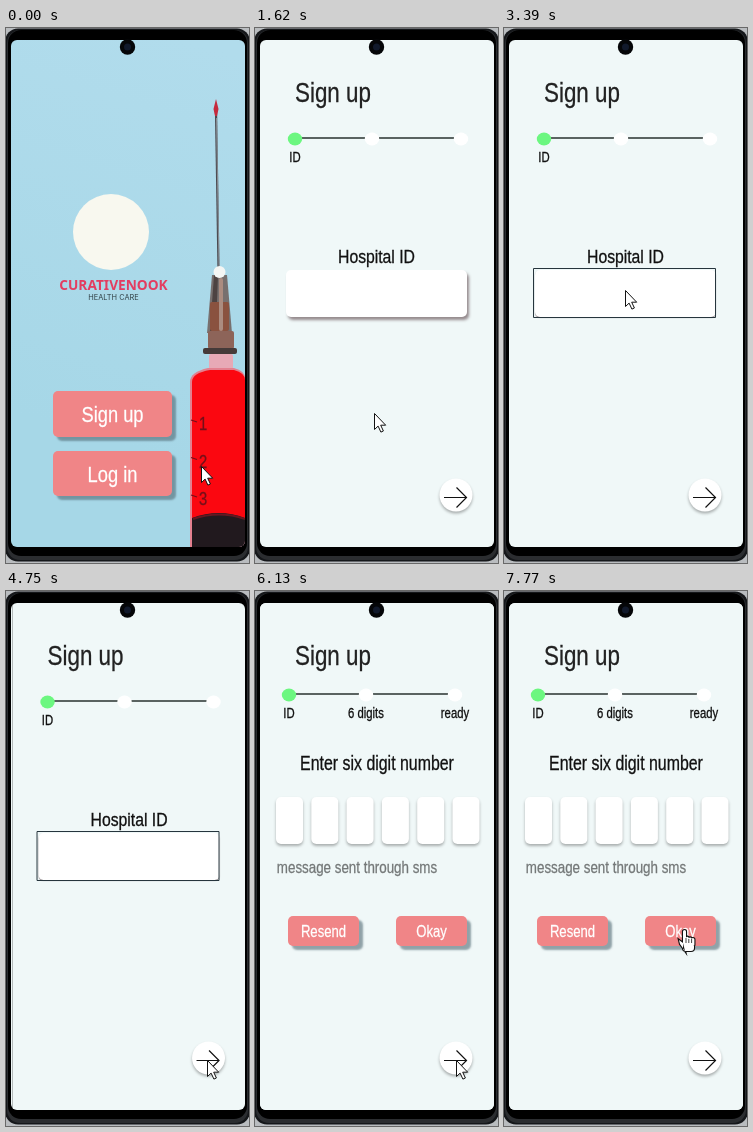
Write an HTML page with a canvas that moves like this. It is 243 px wide and 535 px high and loops after 8000 ms.

```html
<!DOCTYPE html>
<html lang="en">
<head>
<meta charset="utf-8">
<title>Health app sign-up</title>
<style>
html, body { margin: 0; width: 100%; height: 100%; overflow: hidden; background: #b9bcbf; }
canvas { display: block; width: 243px; height: 535px; }
</style>
</head>
<body>
<canvas id="stage" width="243" height="535"></canvas>
<script>
const ctx = document.getElementById('stage').getContext('2d');
const LOOP = 8000, TICK = 125;
const LEFT = 5, TOP = 12, WIDTH = 234, HEIGHT = 507;
const NARROW = 0.82; // one condensed face for all interface text
const CORAL = '#f08587', INK = '#111';

const FORM_AT = 1620, HOVER_AT = 2670, FOCUS_AT = 3390, PUSH_AT = 4700, FADE_AT = 5850, CODE_AT = 6120;

// Pointer moves: start, end, destination
const START = { x: 195, y: 438 };
const MOVES = [
  { from: 0, to: 600, x: 119, y: 385 },
  { from: 2400, to: 2750, x: 121, y: 262 },
  { from: 3560, to: 4125, x: 201, y: 469 },
  { from: 6450, to: 7125, x: 104, y: 343 },
  { from: 7250, to: 7750, x: 180, y: 338 }
];

const progress = (t, from, to) => Math.min(1, Math.max(0, (t - from) / (to - from)));
const smooth = p => p * p * (3 - 2 * p);
const cubic = p => p < 0.5 ? 4 * p ** 3 : 1 - 4 * (1 - p) ** 3;
const mix = (a, b, p) => a + (b - a) * p;

function rect(x, y, w, h, r, fill) {
  ctx.fillStyle = fill;
  ctx.beginPath();
  ctx.roundRect(x, y, w, h, r);
  ctx.fill();
}

function oval(x, y, rx, ry, fill) {
  ctx.fillStyle = fill;
  ctx.beginPath();
  ctx.ellipse(x, y, rx, ry, 0, 0, Math.PI * 2);
  ctx.fill();
}

function line(d, color, width) {
  ctx.strokeStyle = color;
  ctx.lineWidth = width;
  ctx.stroke(new Path2D(d));
}

function shape(d, fill) {
  ctx.fillStyle = fill;
  ctx.fill(new Path2D(d));
}

function withShadow(color, dx, dy, blur, draw) {
  ctx.save();
  ctx.shadowColor = color;
  ctx.shadowOffsetX = dx;
  ctx.shadowOffsetY = dy;
  ctx.shadowBlur = blur;
  draw();
  ctx.restore();
}

function label(text, x, y, size, color = INK, align = 'center') {
  ctx.save();
  ctx.translate(x, y);
  ctx.scale(NARROW, 1);
  ctx.font = `${size}px "Liberation Sans", Arial, sans-serif`;
  ctx.textAlign = align;
  ctx.fillStyle = ctx.strokeStyle = color;
  ctx.lineWidth = 0.3;
  ctx.fillText(text, 0, 0);
  ctx.strokeText(text, 0, 0);
  ctx.restore();
}

function caption(text, y, font, color) {
  ctx.font = font;
  ctx.textAlign = 'center';
  ctx.fillStyle = color;
  ctx.fillText(text, 107.5, y);
}

function button(text, x, y, w, h, size) {
  withShadow('rgba(80,105,115,.6)', 4, 4, 2, () => rect(x, y, w, h, 5, CORAL));
  label(text, x + w / 2, y + h / 2 + size * 0.36, size, '#fff');
}

function syringe() {
  line('M210 82L212.5 240', '#4b4a50', 2.2);
  line('M210.5 90L213 238', '#a3adb4', 0.7);
  shape('M210 71l2.5 10-1.5 7h-2l-1.5-7z', '#c52a3d');

  shape('M206 247h15l5 58h-25z', '#77706f');
  shape('M208 247h4l-2 56h-6z', '#4d4342');
  rect(204, 274, 19, 29, 2, '#8a523f');
  rect(213, 250, 4, 53, 2, '#ab8c80');
  oval(213.5, 244, 6, 6, '#f4f6f4');
  rect(202, 303, 26, 18, 2, '#8d6459');
  rect(197, 320, 34, 6, 2, '#453a39');

  rect(203, 326, 24, 16, 2, '#e7a9b6');
  shape('M184 519V354q0-10 18-14h26q11 3 11 10v169z', '#e3808f');
  shape('M186 490V354q0-9 18-12h24q11 3 11 10v138z', '#fb0710');
  shape('M186 519V490q27-10 53 0v29z', '#21191e');
  line('M187 491q26-9 52 0', '#661821', 2);
  for (let i = 0; i < 3; i++) {
    const y = 396 + i * 37.5;
    line(`M185 ${y - 4}l6 2`, '#74101a', 1.2);
    label(i + 1, 197, y + 6, 18, '#74101a');
  }
}

function welcome() {
  const sky = ctx.createLinearGradient(180, TOP, 60, 400);
  sky.addColorStop(0, '#b1dcec');
  sky.addColorStop(1, '#a6d7e7');
  rect(LEFT, TOP, WIDTH, HEIGHT, 0, sky);
  syringe();
  oval(105, 204, 38, 38, '#f8f8ef');
  caption('CURATIVENOOK', 262, '600 13.7px "Noto Sans", sans-serif', '#e33d60');
  caption('HEALTH CARE', 272, '7.4px Inter, sans-serif', '#334349');
  button('Sign up', 47, 363, 119, 46, 22.3);
  button('Log in', 47, 423, 119, 45, 22.3);
}

// The form shell: title, progress dots and next arrow
function form(x, y, stepNames) {
  rect(LEFT, TOP, WIDTH, HEIGHT, 0, '#f0f8f8');
  label('Sign up', 40, 74, 27.3, '#222', 'left');
  line(`M${x} ${y - 1}h166`, '#28322f', 1.6);
  [0, 77, 166].forEach((dx, i) => {
    oval(x + dx, y, 7.2, 6.5, i ? '#fff' : '#6cf780');
    label(stepNames[i] || '', x + dx, y + 23, 13.8);
  });
  withShadow('rgba(0,0,0,.3)', 0, 2, 3, () => oval(201, 467, 16.5, 16.5, '#fff'));
  line('M189 469.5h23m-10.5-10l10 10l-10 10', INK, 1.2);
}

function idPage(t) {
  form(40, 111, ['ID']);
  label('Hospital ID', 121.5, 235, 19.2);
  const lift = t < HOVER_AT ? 3 : 1;
  withShadow('rgba(75,50,55,.55)', lift - 1, lift, lift, () => rect(31, 242, 181, 47, 5, '#fff'));
  if (t >= FOCUS_AT) line('M29.5 240.5h182v49h-182z', '#26353d', 1);
}

function codePage() {
  form(34, 104, ['ID', '6 digits', 'ready']);
  label('Enter six digit number', 122, 179, 19.4);
  for (let i = 0; i < 6; i++) {
    withShadow('rgba(0,0,0,.3)', 0, 2, 3, () => rect(21 + i * 35.3, 206, 27, 47, 5, '#fff'));
  }
  label('message sent through sms', 102, 282, 16.3, '#747878');
  button('Resend', 33, 325, 71, 30, 16);
  button('Okay', 141, 325, 71, 30, 16);
}

function shifted(dx, draw) {
  ctx.save();
  ctx.translate(dx, 0);
  draw();
  ctx.restore();
}

function screen(t, held) {
  if (t < FORM_AT) return welcome();
  const push = WIDTH * cubic(progress(held, PUSH_AT, PUSH_AT + 425));
  if (push < WIDTH) shifted(push, () => idPage(t));
  if (push > 0) shifted(push - WIDTH, () => idPage(HOVER_AT));
  ctx.globalAlpha = progress(held, FADE_AT, CODE_AT);
  if (ctx.globalAlpha > 0) codePage();
  ctx.globalAlpha = 1;
}

function arrow() {
  const path = 'M.5.5v16l3.6-3.4 2.8 6 2.5-1.1-2.7-5.8h5z';
  shape(path, '#fff');
  line(path, INK, 1);
}

function hand() {
  const path = new Path2D('M-1 14l-4-3 1 4 5 7z');
  path.roundRect(-1, 1, 3, 14, 1.5);
  for (let i = 1; i < 4; i++) path.roundRect(-1 + i * 2.8, 7 + i * 0.7, 3, 8, 1.5);
  path.roundRect(-1, 11, 11, 11, 3);
  ctx.strokeStyle = INK;
  ctx.lineWidth = 2.2;
  ctx.stroke(path);
  ctx.fillStyle = '#fff';
  ctx.fill(path);
  line('M2 9v5m2.8-4v4m2.8-4v4', INK, 0.8);
}

function pointer(t, held) {
  const { x, y } = MOVES.reduce((at, move) => {
    const p = smooth(progress(held, move.from, move.to));
    return { x: mix(at.x, move.x, p), y: mix(at.y, move.y, p) };
  }, START);
  const onButton = t > CODE_AT && y < 355 && (x < 105 || x > 141);
  ctx.save();
  ctx.translate(x, y);
  (onButton ? hand : arrow)();
  ctx.restore();
}

function phone() {
  rect(0, 0, 243, 535, 0, '#b9bcbf');
  rect(-1, 0.5, 245, 533, 13, '#15171a');
  rect(1, 2, 241, 530, 13, '#2b2d30');
  rect(2, 2, 239, 526, 13, '#000');
}

function render(t) {
  const held = Math.floor(t / TICK) * TICK; // motion advances in short holds
  phone();
  ctx.save();
  ctx.beginPath();
  ctx.roundRect(LEFT, TOP, WIDTH, HEIGHT, 6);
  ctx.clip();
  screen(t, held);
  ctx.restore();
  oval(121.5, 19, 7.7, 7.7, '#050608');
  oval(121.5, 19, 3.5, 3.5, '#11192b');
  pointer(t, held);
}

const start = performance.now();
function tick(now) {
  render(Math.max(0, now - start) % LOOP);
  requestAnimationFrame(tick);
}
tick(start);
</script>
</body>
</html>
```
